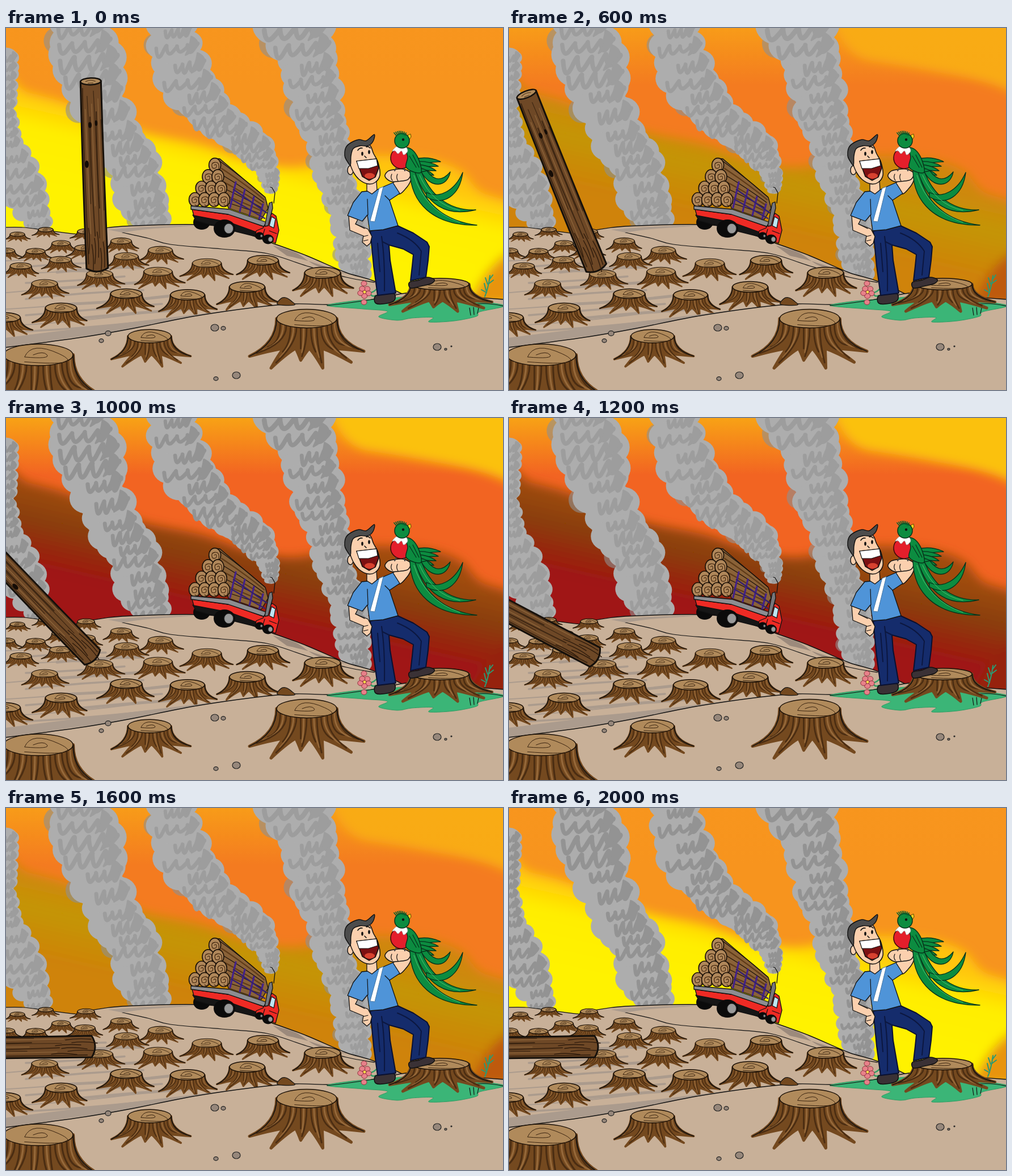
An HTML page that plays this animation: 876 by 639 pixels, repeating every 2200 ms.

```html
<!DOCTYPE html>
<html lang="en">
<head>
<meta charset="utf-8">
<title>Falling tree</title>
<style>
html, body { margin: 0; width: 100%; height: 100%; overflow: hidden; background: #c8b098; }
svg { display: block; width: 100vw; height: 100vh; }
path { stroke-linecap: round; stroke-linejoin: round; }
</style>
</head>
<body>
<svg id="stage" viewBox="0 0 876 639" preserveAspectRatio="none"></svg>
<script>
const STEP = 200, STEPS = 11;

let seed = 7;
const rnd = () => (seed = (seed * 16807) % 2147483647) / 2147483647;
const n = v => +v.toFixed(1);
const mix = (a, b, t) => a + (b - a) * t;
const points = s => s.trim().split(/\s+/).map(p => p.split(',').map(Number));
const repeat = (count, fn) => Array.from({ length: count }, (_, i) => fn(i)).join('');

// ---- drawing helpers
const path = (d, fill, stroke = 'none', w = 1) =>
  `<path d="${d}" fill="${fill}" stroke="${stroke}" stroke-width="${n(w)}"/>`;
const line = (d, w = 1.2, color = '#111') => path(d, 'none', color, w);
const oval = (x, y, rx, ry, fill, stroke = 'none', w = 1) =>
  `<ellipse cx="${n(x)}" cy="${n(y)}" rx="${n(rx)}" ry="${n(ry)}" fill="${fill}" stroke="${stroke}" stroke-width="${n(w)}"/>`;
const poly = (s, fill, stroke = '#111', w = 1.3) => path('M' + s + 'Z', fill, stroke, w);

function curve(s, closed) {
  const p = points(s), c = p.length;
  const at = i => closed ? p[(i + c) % c] : p[Math.max(0, Math.min(c - 1, i))];
  let d = 'M' + p[0];
  for (let i = 0; i < (closed ? c : c - 1); i++) {
    const [a, b, e, f] = [at(i - 1), at(i), at(i + 1), at(i + 2)];
    d += 'C' + [b[0] + (e[0] - a[0]) / 6, b[1] + (e[1] - a[1]) / 6,
      e[0] - (f[0] - b[0]) / 6, e[1] - (f[1] - b[1]) / 6, e[0], e[1]].map(n);
  }
  return d + (closed ? 'Z' : '');
}
const blob = (s, fill, stroke = '#111', w = 1.5) => path(curve(s, true), fill, stroke, w);

// ---- sky: two paintings, crossfaded
const gradient = (id, box, stops) => {
  const [x1, y1, x2, y2] = box;
  return `<linearGradient id="${id}" gradientUnits="userSpaceOnUse" x1="${x1}" y1="${y1}" x2="${x2}" y2="${y2}">` +
    stops.map(([o, c]) => `<stop offset="${o}" stop-color="${c}"/>`).join('') + '</linearGradient>';
};
function sky(id, { top, main, edge, mid, low, side, corner }) {
  return `<g id="${id}">` +
    gradient(id + 'Upper', [0, -50, 0, 100], [[0, top], [1, main]]) +
    gradient(id + 'Band', [400, 195, 367, 341], [[0, edge], [.4, mid], [1, low]]) +
    `<rect width="876" height="639" fill="url(#${id}Upper)"/><g filter="url(#soft)">` +
    path(corner, top) +
    path(curve('-40,95 40,114 105,132 180,160 245,185 345,206 430,235 500,246 560,238 640,226 740,232 800,252 835,288 910,335 910,520 -40,520', true), `url(#${id}Band)`) +
    path('M910 385Q850 405 815 490H910Z', side) + '</g></g>';
}
const DAY = {
  top: '#f8961d', main: '#f7941e', edge: '#ffc40c', mid: '#ffee00', low: '#fff200', side: '#e8940f',
  corner: 'M800 0'
};
const DUSK = {
  top: '#fbc10f', main: '#f26422', edge: '#a04c0a', mid: '#8a3f06', low: '#a01414', side: '#96200e',
  corner: 'M570-30Q585 50 640 58T790 84T920 138V-30Z'
};

// ---- smoke: key points are x, y, half width
const COLUMNS = [
  '-2,50,26 -4,150,24 0,200,30 25,275,50 57,345,26',
  '130,-5,54 143,50,68 156,110,60 185,180,54 226,245,51 238,300,50 254,340,36',
  '290,0,46 318,90,56 365,158,48 430,204,43 463,255,22 467,285,13',
  '507,-5,74 532,60,54 548,140,51 570,210,40 574,260,37 602,315,36 612,400,32 617,430,27'
];
function lumps(keys) {
  const p = points(keys), out = [];
  for (let i = 1; i < p.length; i++) {
    const [a, b] = [p[i - 1], p[i]];
    const count = Math.ceil(Math.hypot(b[0] - a[0], b[1] - a[1]) / ((a[2] + b[2]) * .34));
    for (let k = 0; k < count; k++) out.push(a.map((v, j) => mix(v, b[j], k / count)));
  }
  return [...out, p[p.length - 1]];
}
function smoke(id, tone, haze) {
  seed = 31;
  let halo = '', base = '', shade = '';
  for (const column of COLUMNS) lumps(column).forEach(([x, y, r], k) => {
    const gray = '#adadad';
    base += oval(x, y, r * .85, r * .6, gray);
    for (const side of [-1, 1]) {
      const out = r * (.44 + rnd() * .1), size = r * (.46 + rnd() * .08);
      base += oval(x + side * out, y + (rnd() - .5) * r * .3, size, size * .9, gray);
    }
    if (haze && k % 4 === 1) halo += oval(x - r * .75, y, r * .4, r * .4, '#8f8f8f99');
    const from = rnd() < .5 ? -.7 : -.2, w = r * (.78 - from) / 4;
    const loops = repeat(4, () => `q${n(w * .1)} ${n(r * (.3 + rnd() * .25))} ${n(w * .6)} ${n(r * .16)}t${n(w * .4)} ${n(-r * .2)}`);
    shade += line(`M${n(x + from * r)} ${n(y + r * .12)}` + loops, 2 + r * .09, tone);
    shade += path(`M${n(x + r * .55)} ${n(y - r * .3)}q${n(r * .52)} ${n(r * .25)} ${n(-r * .2)} ${n(r * .66)}q${n(r * .15)} ${n(-r * .3)} ${n(r * .2)} ${n(-r * .66)}`, tone, tone, 3);
  });
  return `<g id="${id}">${halo + base + shade}</g>`;
}

// ---- stumps
const FIELD = '70,356 141,359 20,364 203,376 97,380 139,388 0,393 52,394 272,392 212,403 96,409 453,410 354,415 26,420 268,430 558,432 165,434 68,451 425,457 212,469 320,471 97,494 -2,511';
const ROOTS = points('-1,.76 -.7,1 -.12,.84 .32,1 .82,.88 1,.66');

function stump(x, y, r, flat = .31, h = r * (.8 + .016 * r)) {
  const ry = r * flat, w = Math.max(1.2, r * .1), ink = r > 26 ? 1.5 : 1.1;
  const tips = ROOTS.map(([u, v]) => [x + u * r * (1.65 + rnd() * .3), y + h * v]);
  const left = `M${x - r} ${y}Q${n(x - r)} ${n(y + h * .5)} ${tips[0].map(n)}`;
  const right = `Q${n(x + r)} ${n(y + h * .45)} ${x + r} ${y}`;
  let roots = '', grain = '';
  tips.forEach(([tx, ty], i) => {
    if (i) {
      const nx = x + (ROOTS[i - 1][0] + ROOTS[i][0]) * r * .45, ny = y + h * .6;
      const [px, py] = tips[i - 1];
      roots += `Q${n(mix(nx, px, .4))} ${n(mix(ny, py, .3))} ${n(nx)} ${n(ny)}Q${n(mix(nx, tx, .4))} ${n(mix(ny, ty, .3))} ${n(tx)} ${n(ty)}`;
    }
    for (let j = 0; j < 3; j++) {
      const sx = x + r * (-.88 + i * .34 + j * .1), k = .4 + j * .2;
      const drop = ry * Math.sqrt(Math.max(0, 1 - ((sx - x) / r) ** 2)) + 1;
      grain += line(`M${n(sx)} ${n(y + drop)}Q${n(sx)} ${n(y + h * .5)} ${n(mix(sx, tx, k))} ${n(mix(y + h * .45, ty, k))}`,
        w * .5, j === 1 ? '#96693a' : '#4b2d12');
    }
  });
  return path(left + roots + right, '#74491f', '#74491f', w) + grain +
    line(left, ink) + line(`M${tips[5].map(n)}` + right, ink) +
    oval(x, y, r, ry, '#b08a5b', '#1a0f06', ink) +
    line(`M${n(x - r * .15)} ${y}q${n(r * .3)} ${n(-ry * .4)} ${n(r * .4)} 0t${n(-r * .65)} ${n(ry * .2)}q${n(r * .2)} ${n(-ry * 1.5)} ${n(r)} ${n(-ry * .3)}t${n(-r)} ${n(ry * .75)}`, ink * .7, '#3a2410');
}
// stumps grow with nearness
const field = () => points(FIELD).map(([x, y]) => stump(x, y, n(12 + (y - 360) * .1 + x * .022))).join('');

// ---- land
const SOIL = '#c8b098', DUST = '#ab9b8d';
const HILL = '205,361 250,371 290,382 380,390 460,398 530,420 600,440 650,449';
function backLand() {
  return path(curve('150,357 205,350 335,347 400,355 470,380 530,402 600,432 655,449 760,500') + 'L760 639H0V420Z', SOIL, '#111', 1.4) +
    path(curve('470,384 510,396 548,420 600,434 535,412 495,402'), '#9c8a7c') +
    path(curve('-10,352 30,352 70,357 130,364 180,362 ' + HILL) + 'L690 639H-10Z', SOIL) +
    line(curve('-10,352 30,352 70,357 130,364 150,357')) + line(curve(HILL)) +
    repeat(15, i => line(`M${i % 3 * 55 - 20} ${n(412 + i * 9.5)}q${70 + i * 4} ${-i % 4 * 3 - 3} ${130 + i * 11} ${n(-6 - i * 1.4)}`, 2 + i % 3 * 1.5, DUST)) +
    path(curve('180,356 250,351 330,349 250,355 205,361'), DUST);
}
function frontLand() {
  let s = path('M-10 548Q220 518 500 487Q360 512 -10 565Z', DUST) +
    path(curve('-10,565 60,556 140,545 220,531 330,509 440,493 510,487 580,488 640,480 715,467 780,472 890,480') + 'V660H-10Z', SOIL, '#111', 1.4) +
    blob('479,488 484,478 493,476 503,482 508,489', '#74491f', '#111', 1.2);
  for (const [x, y, r] of points('368,529,7 383,530,4 406,613,7 370,619,4 760,563,7 775,567,2 785,562,1 168,552,4 180,539,5'))
    s += oval(x, y, r, r * .85, '#96877b', '#222', 1.2);
  return s + blob('566,490 610,482 665,478 720,474 800,475 850,484 878,491 835,501 829,509 790,517 746,519 752,511 715,512 690,516 657,510 672,500 630,496', '#3bb577', '#2f9c63', 1) +
    line('M566 490Q610 485 660 477M819 507l-2-13M825 506l-1-13M831 504l2-10M830 487Q850 485 878 491') +
    line('M844 474Q850 460 853 437M846 463l-3-12M849 452l-4-11M850 452l9-7M852 444l6-8M847 467l-9-5', 2, '#2b9a72');
}

// ---- truck
function truck() {
  const logEnd = (x, y) => oval(x, y, 10.5, 12.5, '#b0875a', '#1a1008', 1.6) +
    line(`M${x - 1} ${y}q4-3 4 2t-7 3q-4-9 4-10t7 9-7 5`, 1.1, '#3c220c');
  const wheel = (x, y, r, hub) => oval(x, y, r, r * .85, '#0b0b0b') + oval(x + r * .4, y, hub, hub * 1.1, '#9a9a9a', '#333');
  let s = oval(345, 343, 15, 13, '#0b0b0b') + poly('329,330 395,344 445,360 440,368 400,358 335,340', '#161616') +
    poly('365,230 377,231 457,299 462,318 450,338 392,318', '#8a6238') +
    repeat(7, i => line(`M${378 + i * 2} ${236 + i * 12}Q${420 + i} ${266 + i * 9} ${456 - i} ${298 + i * 5}`, i % 2 ? 2.2 : 1.2, i % 2 ? '#5f3b18' : '#1a1008'));
  for (let row = 3; row >= 0; row--)
    for (let k = 0; k < 4 - row; k++) s += logEnd(n(333 + row * 11.7 + k * 17), n(303 - row * 20.3));
  return s + repeat(4, i => line(`M${405 + i * 16} ${272 + i * 13}L${395 + i * 17} ${317 + i * 7}`, 3.2, '#43228a')) +
    repeat(2, i => line(`M${401 - i * 4} ${285 + i * 17}L${459 - i * 3} ${326 + i * 10}`, 2.5, '#35206c')) +
    poly('328,320 392,329 458,352 452,364 394,343 331,331', '#ee2a24') +
    poly('326,314 393,320 462,344 460,352 392,329 326,320', '#8d8d91') +
    poly('453,353 461,338 469,327 476,332 481,357 475,380 440,364 441,358', '#ee2a24') +
    poly('468,333 475,337 472,353 464,349', '#bfe5f3') + line('M464 358l13 5M456 355l-3 10') +
    poly('464,309 469,307 470,318 462,349 456,350', '#77777b') + line('M469 282l5 9-2 18M469 282l-3-1', 1.3) +
    wheel(385, 354, 19, 8) + wheel(447, 367, 8, 2) + wheel(462, 373, 10, 4);
}

// ---- man, bird and flower
function man() {
  const skin = '#fbd0ae', shoe = '#3a3135';
  return blob('651,473 668,470 684,469 685,480 672,486 652,486', shoe) +
    blob('711,449 728,445 742,440 755,444 750,451 730,456 713,459', shoe) +
    poly('642,358 690,349 718,362 742,378 746,386 744,410 740,440 713,446 716,420 718,400 700,390 675,383 677,410 687,468 655,472 648,420', '#152c6c', '#0a1030', 2) +
    line('M662 368q6 40 5 96M690 362q30 12 42 32l-4 42M655 380l4 50M675 383l-12-6', 2, '#0c1740') +
    poly('604,332 620,338 616,346 638,355 645,368 642,380 636,385 628,378 630,367 606,357', skin) + line('M630 368l8-2M630 376l8-2M616 346l16 8') +
    blob('680,276 696,266 714,256 713,270 704,284 692,293', skin) +
    blob('668,262 673,253 684,250 700,249 713,256 709,267 698,270 679,271', skin) + line('M680 258q-3 6 1 11M690 258q-3 6 1 12') +
    poly('636,270 636,289 645,296 654,287 653,270', skin) +
    poly('627,289 637,288 645,293 655,285 668,279 682,273 694,292 676,304 691,349 665,356 641,358 637,330 628,341 602,331 612,308', '#4f94d8') +
    poly('658,283 665,280 650,342 642,341', '#fff', '#4a78a5', 1) + line('M637 302l1 28M676 304l-8-8') +
    oval(607, 251, 5, 8, skin, '#111', 1.4) +
    blob('607,217 620,208 640,206 648,222 656,238 659,260 650,273 637,275 622,267 611,252 606,236', skin) +
    blob('597,225 599,211 607,203 622,197 635,199 649,188 647,200 638,208 624,208 612,213 608,226 607,242 600,233', '#4c4c4c') +
    poly('618,235 653,231 657,247 651,263 640,269 628,262', '#7c1012', '#111', 1.6) +
    poly('618,235 653,231 655,243 639,248 622,248', '#fff', '#111', 1.1) + oval(641, 261, 9, 5, '#d8422f') +
    oval(628, 222, 1.8, 3.4, '#111') + oval(640, 219, 1.8, 3.4, '#111') + line('M620 216q3-5 8-4M635 210q4-2 7 2M632 226l3 3', 1.6);
}
function bird() {
  const green = '#0c8c40', ink = '#06331b';
  const plume = d => path(d, green, ink, 1.4);
  return repeat(4, i => plume(`M715 ${232 + i * 4}Q${745} ${225 + i * 8} ${766 - i * 4} ${236 + i * 8}Q740 ${238 + i * 7} 715 ${240 + i * 4}Z`)) +
    plume('M712 250C712 308 752 349 830 348C768 340 732 305 722 252Z') +
    plume('M720 252C740 312 775 334 828 321C776 323 745 290 731 250Z') +
    plume('M741 298C770 316 800 296 805 255C791 287 764 302 741 290Z') +
    plume('M732 254C748 284 778 282 783 254C769 271 754 270 742 252Z') +
    line('M719 260Q738 322 800 343M729 260Q752 312 800 322', 1, '#4fc071') +
    blob('678,228 684,216 698,212 710,226 707,244 694,248 682,241', '#e41e2b', '#3a0808') +
    blob('704,212 716,215 727,231 732,254 718,254 705,245 708,228', green, ink) +
    line('M711 226l12 20M717 224l11 22', 1.2, ink) +
    blob('681,217 689,209 703,209 708,217 701,224 697,217 691,222 686,217', '#fff', '#999', .8) +
    poly('707,190 713,187 714,192 708,202', '#ffd51e', '#5c4300', 1) +
    oval(698, 199, 13, 13, green, ink, 1.5) +
    repeat(8, i => line(`M${n(688 + i * 2.2)} ${n(190 - Math.sin(i * .45) * 3)}l${n(i * .8 - 4)} -5`, 1.7, '#08602c')) +
    oval(700, 197, 2.2, 2.2, '#111') + line('M688 247l-3 5M701 247l2 5', 2, '#444');
}
function flower() {
  const petal = (x, y) => oval(x, y, 5, 4.5, '#e88089', '#8d3540');
  return line('M632 468q13 2 22-8M641 468q4 8 11 4', 2.5, '#2f9c63') +
    repeat(5, i => petal(632 + Math.cos(i * 1.256 - .9) * 7.5, 466 + Math.sin(i * 1.256 - .9) * 7)) +
    oval(632, 466, 3, 3, '#f7d84b', '#8d3540') + petal(631, 484) + petal(631, 451);
}

// ---- trunk, upright with its base at the origin
function trunk() {
  return path('M-18-334Q-20-180-19-4Q0 8 19-4Q17-170 18-334Z', '#6e4826', '#15100b', 3) +
    repeat(9, i => line(`M${n(-15 + i * 3.8)} ${-322 + i * 37 % 60}q${i % 3 * 2 - 2} 90 ${i % 2 * 2} ${310 - i * 53 % 110 - i * 37 % 60}`, i % 3 ? 1.2 : 2, i % 3 === 1 ? '#8f673c' : '#3d2612')) +
    repeat(6, i => line(`M${-13 + i * 5} ${-75 + i * 29 % 40}q3 20 ${i % 2 * 2 - 1} 45`, 1.4, '#2e1b0c')) +
    oval(-4, -257, 3, 5.5, '#140c06') + oval(7, -260, 2.2, 5, '#140c06') + oval(-12, -188, 3.5, 6.5, '#140c06') +
    oval(0, -334, 18, 6, '#b08a5b', '#15100b', 2.5) + line('M-9-334q9-4 17 0M-5-331h9', 1, '#4a2e15');
}

const stage = document.getElementById('stage');
stage.innerHTML =
  '<filter id="soft" x="-20%" y="-20%" width="140%" height="140%"><feGaussianBlur stdDeviation="9"/></filter>' +
  sky('day', DAY) + sky('dusk', DUSK) +
  smoke('hazy', '#9d9d9d', true) + smoke('dense', '#939393', false) +
  backLand() + truck() + field() + `<g id="trunk">${trunk()}</g>` + frontLand() +
  stump(253, 544, 38) + stump(530, 513, 53) + stump(57, 577, 61) + stump(765, 452, 51, .2, 48) +
  flower() + man() + bird();

// ---- animation
const DARKNESS = [0, 1, 1, 2, 3, 4, 4, 3, 2, 1, 0];
const HAZE = [0, 3, 6, 8];
const FALL = 8;
const [dusk, hazy, dense, tree] = ['dusk', 'hazy', 'dense', 'trunk'].map(id => document.getElementById(id));
const smooth = v => v * v * (3 - 2 * v);

function draw(now) {
  const step = Math.floor(now / STEP) % STEPS;
  const u = Math.min(1, step / FALL);
  const lean = 2 + 88.5 * (.6 * u + .4 * smooth(Math.max(0, (u - .45) / .55)));
  const x = 155 + 6 * (1 - u) ** 6, y = 428 - 7 * u * u;
  tree.setAttribute('transform', `translate(${n(x)} ${n(y)}) rotate(${n(-lean)})`);
  dusk.style.opacity = DARKNESS[step] / 4;
  const isHazy = HAZE.includes(step);
  hazy.style.display = isHazy ? '' : 'none';
  dense.style.display = isHazy ? 'none' : '';
}
const start = performance.now();
function tick() {
  draw(performance.now() - start);
  requestAnimationFrame(tick);
}
tick();
</script>
</body>
</html>
```
